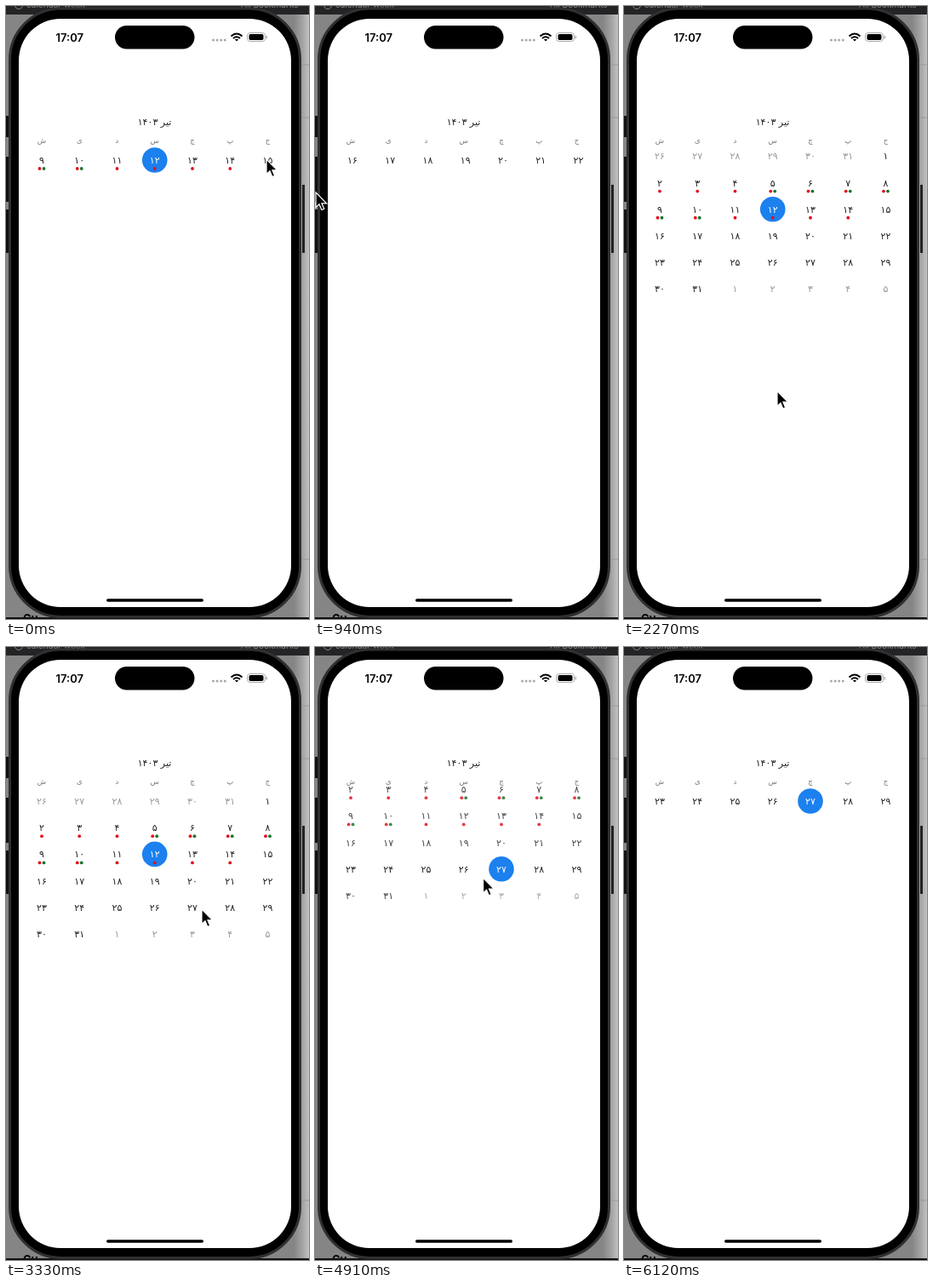
Animation of 356 by 720 pixels, one loop 6.39 s. Source, as an HTML page:

```html
<!DOCTYPE html>
<html lang="fa">
<meta charset="utf-8">
<title>Calendar</title>
<style>
  html, body { margin: 0; width: 100%; height: 100%; overflow: hidden; background: #b4b4b4 }
  svg { display: block }
  text { font-family: "DejaVu Sans", sans-serif; text-anchor: middle }
  .latin { font-family: Inter, sans-serif; text-anchor: start }
</style>
<svg id="stage" width="356" height="720" viewBox="0 0 356 720">
  <defs>
    <linearGradient id="shade">
      <stop offset="0" stop-color="#858585"/><stop offset=".95" stop-color="#858585"/>
      <stop offset=".98" stop-color="#a5a5a5"/><stop offset="1" stop-color="#c2c2c2"/>
    </linearGradient>
    <clipPath id="screen"><rect id="window" x="15" y="164" width="320"/></clipPath>
  </defs>

  <rect width="356" height="720" fill="url(#shade)"/>
  <path d="M346 69H356M346 131H356M346 650H356" stroke="#999"/>
  <rect width="356" height="10" fill="#242426"/>
  <g class="latin" font-size="10" fill="#8a8a8a">
    <circle cx="15" cy="-1" r="4.5" fill="none" stroke="#8a8a8a"/>
    <text class="latin" x="24" y="2">calendar week</text>
    <text class="latin" x="276" y="2">All Bookmarks</text>
  </g>
  <text class="latin" x="20" y="724" font-size="13" font-weight="700">Cu</text>
  <rect y="718" width="356" height="2" fill="#111"/>
  <path d="M1 129V154M1 177V230M1 239V290" stroke="#111" stroke-width="4"/>
  <path d="M349.5 210V290" stroke="#222" stroke-width="3"/>
  <rect x="4.5" y="3" width="341" height="714.5" rx="60" fill="#000" stroke="#303032" stroke-width="3"/>
  <rect x="15" y="15" width="320" height="691" rx="49" fill="#fff"/>

  <rect x="128" y="23" width="93.500" height="27.500" rx="13.750"/>
  <text class="latin" x="58.500" y="41.500" font-size="13" font-weight="600">17:07</text>
  <path d="M243.500 40h14" stroke="#aaa" stroke-width="3" stroke-linecap="round" stroke-dasharray="0 4.600"/>
  <g fill="none" stroke="#000" stroke-width="2">
    <path d="M264.500 35.500Q271 29.500 277.500 35.500M267 38Q271 34.500 275 38"/>
    <path d="M269.500 39.500h3L271 41z" stroke-width="1"/>
  </g>
  <rect x="283.500" y="31.500" width="21" height="10" rx="3.200" fill="none" stroke="#aaa"/>
  <rect x="285.500" y="33" width="17" height="7" rx="1.800"/>
  <path d="M306.300 35v3.500" stroke="#aaa" stroke-width="1.300"/>
  <rect x="118" y="696.300" width="114" height="3.500" rx="1.750"/>

  <text x="174.500" y="140" font-size="11" fill="#222" direction="rtl">تیر ۱۴۰۳</text>
  <g id="weekdays" font-size="8.500" fill="#777"></g>
  <g id="rows" clip-path="url(#screen)" font-size="11"></g>
  <path id="cursor" d="M0 0V17.500L4 13.800 6.800 20.500 9.700 19.300 6.900 12.800H12.600Z" stroke="#fff" stroke-width="1.200"/>
</svg>
<script>
const LOOP = 6390, PAGE = 320, PITCH = 31.2, TOP = 181;
const $ = id => document.getElementById(id);
const add = (parent, tag, attrs, text = '') => {
  const el = document.createElementNS('http://www.w3.org/2000/svg', tag);
  for (const k in attrs) el.setAttribute(k, attrs[k]);
  el.textContent = text;
  return parent.appendChild(el);
};
const persian = n => String(n).replace(/\d/g, d => String.fromCharCode(0x6F0 + +d));
const columnX = i => 42 + 44.25 * i;

[...'شیدسچپج'].forEach((day, i) => add($('weekdays'), 'text', { x: columnX(i), y: 161 }, day));

const selectable = {};
const rows = Array.from({ length: 6 }, (_, r) => {
  const row = add($('rows'), 'g');
  for (let c = 0; c < 7; c++) {
    const n = r * 7 + c - 5, x = columnX(c);
    const inMonth = n > 0 && n < 32;
    const day = n < 1 ? n + 31 : n > 31 ? n - 31 : n;
    const picked = n === 12 || n === 27;
    const disc = picked && add(row, 'circle', { cx: x, cy: 0, r: 14.8, fill: '#1c80ee' });
    const label = add(row, 'text', { x, y: 4, fill: inMonth ? '#222' : '#999' }, persian(day));
    if (picked) selectable[n] = { disc, label };
    if (n > 1 && n < 15) {
      const both = n > 4 && n < 11;
      add(row, 'circle', { cx: both ? x - 2.5 : x, cy: 10, r: 1.9, fill: '#e3101c' });
      if (both) add(row, 'circle', { cx: x + 2.5, cy: 10, r: 1.9, fill: '#17752c' });
    }
  }
  return row;
});

// Smooth interpolation through keys [time, value, ...] that rests at turning points.
function track(keys, t, k = 1) {
  const last = keys.length - 1;
  if (t <= keys[0][0]) return keys[0][k];
  if (t >= keys[last][0]) return keys[last][k];
  const i = keys.findIndex(key => key[0] > t) - 1;
  const slope = j => (keys[j + 1][k] - keys[j][k]) / (keys[j + 1][0] - keys[j][0]);
  const tangent = j => {
    if (j < 1 || j >= last) return 0;
    const a = slope(j - 1), b = slope(j);
    return a * b <= 0 ? 0 : 2 * a * b / (a + b);
  };
  const [a, b] = [keys[i], keys[i + 1]], h = b[0] - a[0], u = (t - a[0]) / h, v = 1 - u;
  return a[k] * v * v * (1 + 2 * u) + b[k] * u * u * (3 - 2 * u)
    + h * u * v * (v * tangent(i) - u * tangent(i + 1));
}

const pointer = [
  [30, 306, 180], [320, 130, 205], [610, 4, 218], [940, 1, 219], [1270, 173, 181],
  [1390, 170, 180], [1550, 170, 180], [1850, 176, 236], [2180, 180, 450], [2580, 180, 456],
  [2730, 180, 456], [3050, 245, 345], [3330, 230, 308], [3390, 230, 308], [3610, 220, 304],
  [3880, 220, 304], [4450, 198, 331], [4670, 198, 331], [5210, 197, 169], [5330, 197, 158],
  [5450, 209, 118], [5670, 209, 118], [6080, 209, -30]
];
const expansion = [
  [1550, 0], [1850, .2], [2180, .92], [2580, 1], [4670, 1], [5210, .03], [5270, 0]
];

function draw(t) {
  const open = track(expansion, t);
  const swipe = 1 - (1 - Math.min(1, Math.max(0, (t - 100) / 1029))) ** 3;
  const paging = t < 1550;
  const active = t < 3880 ? 3 : 4;
  $('window').setAttribute('height', 33 + open * 157);

  rows.forEach((row, i) => {
    const x = paging ? PAGE * (i - 2 - swipe) : 0;
    const y = TOP + (paging ? 0 : PITCH * (i - active * (1 - open)));
    const alpha = paging ? +(i === 2 || i === 3) : i === active ? 1 : Math.min(1, open * 1.3);
    row.setAttribute('transform', `translate(${x} ${y})`);
    row.setAttribute('opacity', alpha);
  });

  const moved = track([[3880, 0], [4060, 1]], t);
  for (const n in selectable) {
    const on = n === '27' ? moved : 1 - moved, g = 34 + 221 * on;
    selectable[n].disc.setAttribute('opacity', on);
    selectable[n].label.setAttribute('fill', `rgb(${g},${g},${g})`);
  }
  $('cursor').setAttribute('transform', `translate(${track(pointer, t)} ${track(pointer, t, 2)})`);
}

const start = performance.now();
(function frame() {
  draw((performance.now() - start) % LOOP);
  requestAnimationFrame(frame);
})();
</script>
</html>
```
